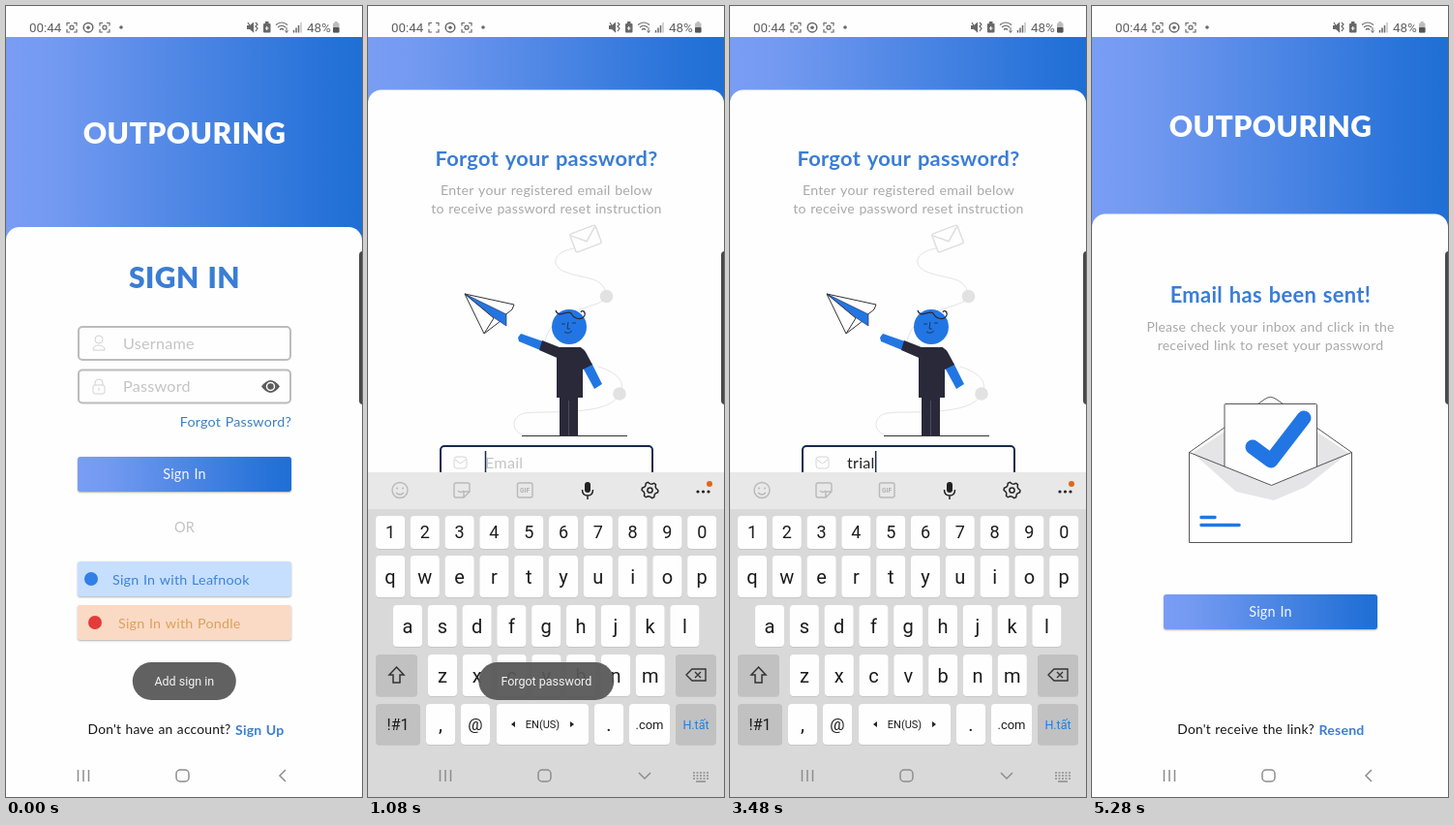
Animation of 368x816 px, one loop 5.4 s. Source, as an HTML page with a canvas:

```html
<!DOCTYPE html>
<html lang="en">
<head>
<meta charset="utf-8">
<title>Password reset</title>
<style>
html, body { margin: 0; width: 100%; height: 100%; overflow: hidden; background: #fefefe; }
canvas { display: block; width: 368px; height: 816px; }
</style>
</head>
<body>
<canvas id="stage" width="368" height="816"></canvas>
<script>
const W = 368, H = 816, LOOP = 5400, STEP = 120;
const ctx = document.getElementById('stage').getContext('2d');
const WHITE = '#fefefe', BLUE = '#2276e3', LINK = '#3a7dd6', GREY = '#a9a9a9', PALE = '#c4c4c4', INK = '#29293a';
const UI = 'Lato, sans-serif', SYS = 'Roboto, sans-serif';

const clamp = v => Math.max(0, Math.min(1, v));
const easeOut = (t, start, length) => 1 - (1 - clamp((t - start) / length)) ** 3;

// y is the middle of the capital letters
function text(s, x, y, size, color, { align = 'center', weight = 400, font = UI } = {}) {
  const spaced = font === UI;
  ctx.font = `${weight} ${size}px ${font}`;
  ctx.letterSpacing = spaced ? size * 0.015 + 'px' : '0px';
  ctx.wordSpacing = spaced ? size * 0.05 + 'px' : '0px';
  ctx.textAlign = align;
  ctx.fillStyle = color;
  ctx.fillText(s, x, y + size * 0.36);
}

function paint(p, { fill, stroke, w = 1 }) {
  if (fill) { ctx.fillStyle = fill; ctx.fill(p); }
  if (stroke) { ctx.strokeStyle = stroke; ctx.lineWidth = w; ctx.stroke(p); }
}
const path = (d, style) => paint(new Path2D(d), style);
function box(x, y, w, h, r, style) {
  const p = new Path2D();
  p.roundRect(x, y, w, h, r);
  paint(p, style);
}
function disc(x, y, r, style) {
  const p = new Path2D();
  p.arc(x, y, r, 0, 7);
  paint(p, style);
}
function at(x, y, draw, angle = 0) {
  ctx.save();
  ctx.translate(x, y);
  ctx.rotate(angle);
  draw();
  ctx.restore();
}
function gradient(x0, x1) {
  const g = ctx.createLinearGradient(x0, 0, x1, 0);
  g.addColorStop(0, '#7a9df4');
  g.addColorStop(0.15, '#7299f0');
  g.addColorStop(0.9, '#2672d8');
  g.addColorStop(1, '#1f6fd5');
  return g;
}

function button(y, fill, label) {
  ctx.save();
  ctx.shadowColor = 'rgba(0,0,0,.3)';
  ctx.shadowBlur = 2;
  ctx.shadowOffsetY = 1;
  box(74, y, 221, 36, 3, { fill });
  ctx.restore();
  if (label) text(label, 184.5, y + 18, 14.4, '#f3f7ff');
}
function field(y, label, color = PALE, stroke = '#bcbcbc') {
  box(75, y, 219, 34, 4, { fill: WHITE, stroke, w: 2 });
  text(label, 121, y + 17, 16.2, color, { align: 'left' });
}
function footer(question, action, split) {
  text(question, split, 746.5, 13.8, '#161616', { align: 'right' });
  text(action, split + 4.5, 746.5, 14.1, LINK, { align: 'left', weight: 700 });
}

function page(titleY, cardY, shift, content) {
  ctx.fillStyle = WHITE;
  ctx.fillRect(0, 0, W, H);
  ctx.save();
  ctx.beginPath();
  ctx.rect(0, 32, W, H);
  ctx.clip();
  ctx.fillStyle = gradient(0, W);
  ctx.fillRect(0, 32, W, 260);
  ctx.translate(0, -shift);
  text('OUTPOURING', 184.5, titleY, 30, '#fff', { weight: 900 });
  box(0, cardY, W, H + 200, 14, { fill: WHITE });
  content();
  ctx.restore();
}

function signInPage() {
  page(131, 228, 0, () => {
    text('SIGN IN', 184.5, 280, 30, LINK, { weight: 900 });
    field(331, 'Username');
    field(375.5, 'Password');
    disc(96, 344, 4, { stroke: '#d2d2d2' });
    path('M90 355 q0 -5 6 -5 q6 0 6 5 z', { stroke: '#d2d2d2' });
    box(90, 391, 12, 9, 2, { stroke: '#d2d2d2' });
    path('M92 391 v-2 a4 4 0 0 1 8 0 v2 M96 394 v3', { stroke: '#d2d2d2' });
    path('M264 392.5 q9.5 -13 19 0 q-9.5 13 -19 0', { fill: '#5c5c5c' });
    disc(273.5, 392.5, 4, { fill: '#5c5c5c', stroke: WHITE, w: 1.5 });
    text('Forgot Password?', 295, 429, 14.3, '#3b7fc4', { align: 'right' });
    button(465, gradient(74, 295), 'Sign In');
    text('OR', 184.5, 537.5, 14.5, PALE);
    button(573, '#c6dfff');
    disc(88, 591, 7, { fill: '#3180e6' });
    text('Sign In with Leafnook', 110, 591.5, 14.3, '#3c83da', { align: 'left' });
    button(618, '#fadac4');
    disc(92, 636, 7, { fill: '#e43b3b' });
    text('Sign In with Pondle', 116, 636.5, 14.3, '#dca05e', { align: 'left' });
    footer("Don't have an account?", 'Sign Up', 232.5);
  });
}

function letterTrail() {
  const trail = { stroke: '#e4e4e4' };
  path('M213 250 C190 254 189 268 203 274 C222 282 244 278 246 298 C246 314 190 308 183 346 M238 372 C262 380 266 390 260 400 C250 424 185 417 162 420 C148 423 148 438 159 442', trail);
  disc(246.5, 299.5, 6.8, { fill: '#e2e2e2' });
  disc(260, 400, 6.8, { fill: '#e2e2e2' });
  at(225, 240, () => {
    box(-14, -10, 28, 20, 2, { fill: WHITE, stroke: '#dedede', w: 1.5 });
    path('M-13 -8 L0 3 L13 -8', { stroke: '#dedede', w: 1.5 });
  }, -0.36);
}
function paperPlane() {
  const edge = { fill: WHITE, stroke: '#333' };
  path('M100 297 L151 308 L149 313 L139 321 Z', edge);
  path('M100 297 L130 322 L120 338 Z', edge);
  path('M120 338 L137 325', edge);
  path('M100 297 L143 318 V330 L131 322 Z', { fill: BLUE, stroke: '#2b3a60', w: 0.7 });
}
function person() {
  path('M155 342 L158 338 L181 346 L178 355 L156 346 Z', { fill: BLUE });
  path('M180 345 L203 354 L200 365 L177 355 Z', { fill: INK });
  path('M222 373 L231 368 L242 390 L234 395 Z', { fill: BLUE });
  path('M216 352 Q222 352 225 357 L232 370 L222 375 L215 366 Z', { fill: INK });
  path('M195 352 H220 L222 355 V404 H195 Z', { fill: INK });
  path('M198 403 H217 V443 H198 Z', { fill: INK });
  path('M207.5 407 V443', { stroke: '#55556a', w: 0.8 });
  disc(208, 331, 18, { fill: BLUE });
  path('M194 314 C197 323 206 313 210 317 C213 323 221 325 224 319 C225 315 221 313 220 316', { stroke: INK, w: 1.2 });
  path('M200 328 h4 M211 327 h4 M207 326 l-1 7 h3 M203 336 q4 3 8 -1', { stroke: '#16396f', w: 1 });
  path('M159 443.5 H268', { stroke: '#333', w: 1.2 });
}

function forgotPage(t, shift) {
  page(124, 214.5, shift, () => {
    text('Forgot your password?', 184.5, 285, 21.8, LINK, { weight: 700 });
    text('Enter your registered email below', 184.5, 317.5, 14.2, GREY);
    text('to receive password reset instruction', 184.5, 336.5, 14.1, GREY);
    at(0, 128, () => { letterTrail(); paperPlane(); person(); });
    const typed = typedText(t), focused = t >= 720 && t < 4500;
    field(582, typed || 'Email', typed ? '#222' : PALE, focused ? '#17294d' : '#bcbcbc');
    if (focused && cursorOn(t)) {
      const x = typed ? 122 + ctx.measureText(typed).width : 121.5;
      path(`M${x} 587 V611`, { stroke: '#17294d', w: 1.5 });
    }
    box(89, 593, 13, 12, 3, { stroke: '#d6d6d6' });
    path('M90 596 L95.5 600 L101 596', { stroke: '#d6d6d6' });
    button(626, gradient(74, 295), 'Send');
    footer('Remember password?', 'Sign In', 232.5);
  });
}

function sentPage() {
  page(124, 214.5, 0, () => {
    const edge = { stroke: '#444', w: 0.9 };
    text('Email has been sent!', 184.5, 298, 21.9, LINK, { weight: 700 });
    text('Please check your inbox and click in the', 184.5, 330.5, 14, GREY);
    text('received link to reset your password', 184.5, 349.5, 14.1, GREY);
    path('M100.5 460.5 L178 406 Q184.5 401 191 406 L268.5 460.5 V553.5 H100.5 Z', { fill: WHITE, ...edge });
    path('M104 461 L137 439 H232 L265 461 L221 496 L188 510 L149 501 Z', { fill: '#e5e5e7' });
    const sheet = 'M137 475 V411.5 Q137 410.5 138 410.5 H231.5 Q232.5 410.5 232.5 411.5 V475';
    path(sheet + ' L185.5 494.5 Z', { fill: WHITE });
    path(sheet, edge);
    path('M100.5 460.5 L185.5 494.5 L268.5 460.5', edge);
    ctx.lineCap = ctx.lineJoin = 'round';
    path('M166 455 L185 469 L219 425', { stroke: BLUE, w: 15 });
    path('M113 527.5 H127 M113 535.5 H152', { stroke: BLUE, w: 3.5 });
    ctx.lineCap = 'butt';
    ctx.lineJoin = 'miter';
    button(607, gradient(74, 295), 'Sign In');
    footer("Don't receive the link?", 'Resend', 230);
  });
}

const strokes = [[2400, 't'], [2640, 'r'], [2880, 'i'], [3120, 'a'], [3360, 'l'], [3600, '@'], [3720, 'k'], [3820, '.com']];
const typedText = t => strokes.filter(s => s[0] <= t).map(s => s[1]).join('');
function cursorOn(t) {
  const last = strokes.reduce((from, [time]) => time <= t ? time : from, 640);
  return (t - last) % 1000 < 500;
}

function keyboard(progress) {
  const key = (x, y, w, h, label, size = 20, dark = false, color = '#1c1c1c') => {
    box(x, y + 1, w, h, 4, { fill: '#c6c6c6' });
    box(x, y, w, h, 4, { fill: dark ? '#c1c1c1' : WHITE });
    text(label, x + w / 2, y + h / 2, size, color, { font: SYS });
  };
  const row = (letters, x, y, h, size) =>
    [...letters].forEach((c, i) => key(x + i * 35.8, y, 30, h, c, size));
  at(0, (1 - progress) * 335, () => {
    ctx.fillStyle = '#d9d9d9';
    ctx.fillRect(0, 481, W, 335);
    ctx.fillStyle = '#e8e8e8';
    ctx.fillRect(0, 481, W, 38);
    toolbar();
    row('1234567890', 8, 526, 34, 18);
    row('qwertyuiop', 8, 567, 43, 20);
    row('asdfghjkl', 26, 618, 43, 20);
    row('zxcvbnm', 62, 669, 43, 20);
    key(8, 669, 43, 43, '', 20, true);
    path('M29.5 682 L37 690 H33 V698 H26 V690 H22 Z', { stroke: '#333', w: 1.5 });
    key(318, 669, 42, 43, '', 20, true);
    path('M329 690 L335 684 H349 V696 H335 Z M338 687 l6 6 m0 -6 l-6 6', { stroke: '#333', w: 1.4 });
    key(8, 720, 46, 42, '!#1', 16, true);
    key(60, 720, 30, 42, ',');
    key(96, 720, 30, 42, '@', 17);
    key(133, 720, 95, 42, 'EN(US)', 11);
    path('M152 738 v6 l-4 -3 z M209 738 v6 l4 -3 z', { fill: '#222' });
    key(234, 720, 30, 42, '.');
    key(270, 720, 42, 42, '.com', 13);
    key(318, 720, 42, 42, 'H.tất', 12.5, true, '#1681e6');
  });
}
function toolbar() {
  const faint = { stroke: '#b9b9b9', w: 1.4 }, dark = { stroke: '#252525', w: 1.5 };
  disc(33, 499.5, 8, faint);
  disc(30, 497.5, 1, { fill: '#b9b9b9' });
  disc(36, 497.5, 1, { fill: '#b9b9b9' });
  path('M29 502 q4 4 8 0', faint);
  path('M91 492 H103 Q105 492 105 494 V501 L99 507 H91 Q89 507 89 505 V494 Q89 492 91 492 M99 507 V501 H105 M93 500 q3 3 6 0', faint);
  box(154.5, 492, 15.5, 15, 2, faint);
  text('GIF', 162, 499.5, 6.5, '#b0b0b0', { font: SYS, weight: 700 });
  box(224, 491, 6, 11, 3, { fill: '#222' });
  path('M221.5 499 q0 6 5.5 6 q5.5 0 5.5 -6 M227 505 v4', dark);
  const gear = new Path2D();
  for (let i = 0; i < 24; i++) {
    const a = i * Math.PI / 12, r = i % 4 < 2 ? 8.4 : 6.6;
    gear.lineTo(291.5 + r * Math.cos(a), 499.5 + r * Math.sin(a));
  }
  gear.closePath();
  paint(gear, dark);
  disc(291.5, 499.5, 2.6, dark);
  for (const x of [341, 346.5, 352]) disc(x, 501, 1.6, { fill: '#222' });
  disc(353, 493, 3, { fill: '#e0661c' });
}

function statusBar(t) {
  const tone = '#686868', line = { stroke: tone, w: 1.2 };
  const capture = x => path(`M${x - 2} 17.5 h-3 v3 M${x + 2} 17.5 h3 v3 M${x - 2} 27 h-3 v-3 M${x + 2} 27 h3 v-3`, line);
  text('00:44', 24, 22.5, 13.4, '#606060', { align: 'left', font: SYS });
  capture(68);
  const phase = t % 1620;
  if (phase < 810 || phase > 1380) disc(68, 22.2, 2, line);
  disc(85, 22.2, 4.8, { stroke: tone, w: 1.5 });
  disc(85, 22.2, 1.8, { fill: tone });
  capture(102);
  disc(102, 22.2, 2, line);
  disc(119, 22, 1.8, { fill: tone });
  path('M249 20 h3 l4 -3.5 v11 l-4 -3.5 h-3 z', { fill: tone });
  path('M250 17 l6 10 M258 17 l2 2 l-2 2 l2 2 l-2 3', line);
  box(266, 18, 7.5, 9.5, 1, { fill: tone });
  box(268, 16, 3.5, 2, 0, { fill: tone });
  path('M268 23 h3.5 M269.7 21 v4', { stroke: WHITE });
  path('M279 19.5 q6 -5 12 0 M281 22 q4 -3.5 8 0 M283 24.5 q2 -2 4 0', line);
  path('M290 22 v5 m-1.5 -1.5 l1.5 2 l1.5 -2', { stroke: tone });
  path('M297.5 25 v2.5 M300 22.5 v5 M302.5 20 v7.5', { stroke: tone, w: 1.5 });
  path('M305 17 v10.5', { stroke: '#c3c3c3', w: 1.5 });
  text('48%', 311, 22.5, 13.4, '#606060', { align: 'left', font: SYS });
  box(338, 17.5, 6.5, 10, 1, { fill: '#bdbdbd' });
  box(338, 22, 6.5, 5.5, 1, { fill: '#555' });
  box(339.7, 16, 3, 2, 0, { fill: '#bdbdbd' });
}

function navBar(typing) {
  const line = { stroke: '#8d8d8d', w: 1.5 };
  path('M74.5 788 v12 M80 788 v12 M85.5 788 v12', line);
  box(176, 788, 13, 12, 4, line);
  path(typing ? 'M280 791 l6 6 l6 -6' : 'M289 788 l-6 6 l6 6', line);
  if (typing) {
    ctx.setLineDash([2, 1.5]);
    for (const y of [791, 794, 797]) path(`M336 ${y} h17`, { stroke: '#8d8d8d', w: 1.6 });
    ctx.setLineDash([]);
    path('M339 800 h10', line);
  }
}

function toast(label, width, alpha) {
  if (alpha <= 0) return;
  ctx.globalAlpha = alpha;
  box(184.3 - width / 2, 677, width, 39, 19.5, { fill: 'rgba(88,88,88,.94)' });
  text(label, 184.3, 696.5, 12.5, '#f4f4f4', { font: SYS });
  ctx.globalAlpha = 1;
}

// New page rises the last few pixels over the dimmed old one
function open(progress, from, to) {
  if (progress < 1) from();
  if (progress <= 0) return;
  ctx.fillStyle = `rgba(0,0,0,${0.2 * clamp(progress * 2)})`;
  if (progress < 1) ctx.fillRect(0, 0, W, H);
  ctx.globalAlpha = clamp(progress * 1.8);
  at(0, Math.round(33 * (1 - progress)), to);
  ctx.globalAlpha = 1;
}

function render(t) {
  const keys = easeOut(t, 820, 240) * (1 - clamp((t - 4320) / 240));
  const forgot = () => forgotPage(t, 128 * keys);
  if (t < 900) open(easeOut(t, 180, 540), signInPage, forgot);
  else open(easeOut(t, 4500, 360), forgot, sentPage);
  if (keys > 0) keyboard(keys);
  statusBar(t);
  navBar(keys > 0.5);
  box(365, 253, 8, 158, 4, { fill: '#4a4a4a' });
  toast('Add sign in', 107, 1 - clamp((t - 600) / 180));
  toast('Forgot password', 140, clamp((t - 760) / 160) * (1 - clamp((t - 2760) / 240)));
}

const begin = performance.now();
function tick() {
  const t = (performance.now() - begin) % LOOP;
  render(Math.floor(t / STEP) * STEP);
  requestAnimationFrame(tick);
}
tick();
</script>
</body>
</html>
```
